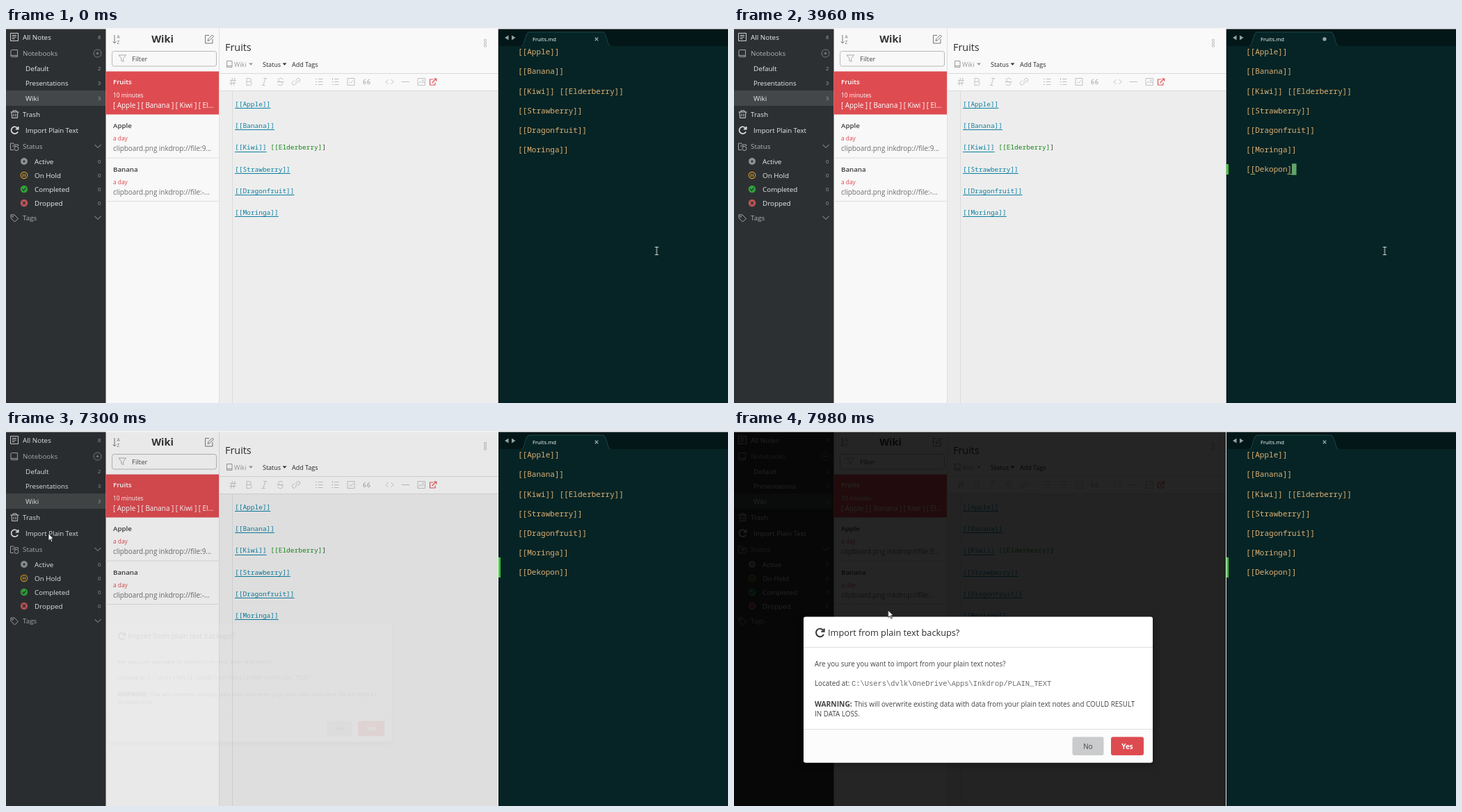
Animation, 1038 px wide and 540 px high, one loop 8 s. Source, as an HTML page:

```html
<!DOCTYPE html>
<html lang="en">
<head>
<meta charset="utf-8">
<title>Plain text import</title>
<style>
html, body { margin: 0; width: 100%; height: 100%; overflow: hidden; background: #062425; }
svg { display: block; width: 1038px; height: 540px; }
text { font: 9.85px "Open Sans", "Noto Sans", sans-serif; fill: #ebecec; white-space: pre; }
.line { fill: none; stroke-width: 1; stroke: #a4a6a8; }
.soft { fill: #adafb0; }
.num text { font-size: 7.5px; fill: #a0a2a4; }
.head { font-size: 9.7px; font-weight: 600; fill: #3c3c3c; }
.ago { font-size: 8.4px; fill: #dc4a50; }
.peek { font-size: 9.9px; fill: #6e6e6e; }
.red text { fill: #fff; }
.bar text { font-size: 9px; fill: #2a2a2a; }
.tools { fill: none; stroke: #c2c2c2; }
.tools text { font-size: 13px; fill: #bdbdbd; stroke: none; }
.md text { font: 9.5px "Noto Sans Mono", "DejaVu Sans Mono", monospace; fill: #0c81a3; }
.md path { stroke: #0c81a3; }
.code text { font: 11.03px "Noto Sans Mono", "DejaVu Sans Mono", monospace; fill: #dcaf74; }
.modal text { font-size: 9.87px; fill: #444; }
.modal .path { font: 10.42px "Liberation Mono", monospace; fill: #6c6c6c; }
.modal .title { font-size: 12.76px; fill: #2c2c2c; }
.modal .warn { font-size: 10.25px; }
.bold { font-weight: 700; }

.pen, .caret, .row, .above, .dirty, .clean, .m1, .m2, .edge, .dim, .modal,
.mouse, .beam, .beam2, .hand, .arrow { animation: 8s step-end -2ms infinite; }

.pen { animation-name: pen; }
@keyframes pen {
  0% { transform: translate(0, -14.1px); }
  12.625% { transform: translate(0, 0); }
  17.75% { transform: translate(6.6px, 0); }
  20.25% { transform: translate(13.2px, 0); }
  30.25% { transform: translate(19.8px, 0); }
  31.875% { transform: translate(26.4px, 0); }
  35.75% { transform: translate(33px, 0); }
  37.625% { transform: translate(39.6px, 0); }
  40.75% { transform: translate(46.2px, 0); }
  43.375% { transform: translate(52.8px, 0); }
  45.25% { transform: translate(59.4px, 0); }
  49.5% { transform: translate(66px, 0); }
  51.875%, 100% { transform: translate(72.8px, 0); }
}
.caret { animation-name: caret; }
@keyframes caret {
  0% { opacity: 0; }
  2.25% { opacity: .5; }
  3.375% { opacity: 1; }
  7.875% { opacity: .66; }
  8.75% { opacity: .33; }
  9.75% { opacity: 0; }
  12.625% { opacity: 1; }
  26% { opacity: 0; }
  30.25% { opacity: 1; }
  56.875% { opacity: .7; }
  57.625% { opacity: .4; }
  58.375% { opacity: .15; }
  59.125%, 100% { opacity: 0; }
}
.row { animation-name: row; }
@keyframes row { 0% { opacity: 0; } 12.625%, 100% { opacity: 1; } }
.above { animation-name: above; }
@keyframes above { 0%, 17.75% { opacity: 0; } 12.625%, 71.25%, 100% { opacity: 1; } }
.dirty { animation-name: dirty; }
@keyframes dirty { 0%, 71.25%, 100% { opacity: 0; } 12.625% { opacity: 1; } }
.clean { animation-name: clean; }
@keyframes clean { 0%, 71.25%, 100% { opacity: 1; } 12.625% { opacity: 0; } }
.m1 { animation-name: m1; }
@keyframes m1 { 0%, 51.875%, 100% { opacity: 0; } 49.5% { opacity: 1; } }
.m2 { animation-name: m2; }
@keyframes m2 { 0%, 71.25%, 100% { opacity: 0; } 51.875% { opacity: 1; } }
.edge { animation-name: edge; }
@keyframes edge { 0% { fill: #b9bcbc; } 85.625%, 100% { fill: #f2f2f2; } }

.dim { animation-name: fade; }
.modal { animation-name: fade, grow; transform-origin: 351px 318px; filter: drop-shadow(1px 3px 4px rgba(0, 0, 0, .3)); }
@keyframes fade {
  0% { opacity: 0; }
  91.25% { opacity: .075; }
  91.5% { opacity: .43; }
  92.375% { opacity: .9; }
  93.375%, 100% { opacity: 1; }
}
@keyframes grow {
  0% { transform: scale(.8); }
  91.25% { transform: scale(.812); }
  91.5% { transform: scale(.882); }
  92.375% { transform: scale(.98); }
  93.375%, 100% { transform: scale(1); }
}

.mouse { animation-name: mouse; animation-timing-function: linear; }
@keyframes mouse {
  0%, 56.875% { transform: translate(935.5px, 321px); }
  59.125% { transform: translate(936.5px, 320px); }
  66.875% { transform: translate(936.5px, 320px); animation-timing-function: ease-in-out; }
  76.875%, 77.25% { transform: translate(50px, 196px); animation-timing-function: ease-out; }
  81.625% { transform: translate(60px, 143px); }
  83.375% { transform: translate(61px, 147.5px); animation-timing-function: step-end; }
  98.75% { transform: translate(140px, 200px); animation-timing-function: step-end; }
  99.75%, 100% { transform: translate(221.5px, 258px); }
}
.beam { animation-name: beam; }
@keyframes beam { 0% { opacity: 1; } 70.4%, 100% { opacity: 0; } }
.beam2 { animation-name: beam2; }
@keyframes beam2 { 0%, 73.25%, 100% { opacity: 0; } 70.4% { opacity: 1; } }
.hand { animation-name: hand; }
@keyframes hand { 0%, 85.625%, 100% { opacity: 0; } 73.25% { opacity: 1; } }
.arrow { animation-name: arrow; }
@keyframes arrow { 0% { opacity: 0; } 85.625%, 100% { opacity: 1; } }
</style>
</head>
<body>
<svg viewBox="0 0 1038 540">
  <defs>
    <path id="redo" d="M4.2-2.9A5 5 0 1 0 4.6 2M5.2-5.2V-1.6H1.4" fill="none" stroke-width="1.7"/>
    <path id="chev" d="M-4.5-2L0 2.5L4.5-2" class="line"/>
    <path id="ibeam" d="M-2.5-5.5H2.5M0-5.5V5.5M-2.5 5.5H2.5" fill="none"/>
  </defs>

  <!-- sidebar -->
  <rect width="143.5" height="540" fill="#2d3033"/>
  <rect y="90" width="143.5" height="22" fill="#434749"/>
  <g>
    <text x="24" y="17">All Notes</text>
    <text x="24" y="40" class="soft">Notebooks</text>
    <text x="28" y="61.5">Default</text>
    <text x="28" y="83" style="font-size:9.6px">Presentations</text>
    <text x="28" y="104.5">Wiki</text>
    <text x="24" y="128">Trash</text>
    <text x="28" y="151" style="font-size:9.65px">Import Plain Text</text>
    <text x="24" y="174" class="soft">Status</text>
    <text x="41" y="195.5">Active</text>
    <text x="41" y="215.5">On Hold</text>
    <text x="41" y="235.5">Completed</text>
    <text x="41" y="255.5">Dropped</text>
    <text x="24" y="277" class="soft">Tags</text>
  </g>
  <g class="num">
    <text x="132" y="16">8</text>
    <text x="132" y="60.5">2</text>
    <text x="132" y="82">3</text>
    <text x="132" y="103.5">3</text>
    <text x="132" y="194.5">0</text>
    <text x="132" y="214.5">0</text>
    <text x="132" y="234.5">0</text>
    <text x="132" y="254.5">0</text>
  </g>
  <g class="line">
    <path d="M6.5 7.5H17.5V18.5H6.5ZM8.8 10.5H15M8.8 13H15M8.8 15.5H12.5" stroke="#d0d1d2"/>
    <path d="M8.5 31.5H16.5V41.5H8.5a1.5 1.5 0 0 1-1.5-1.5V33a1.5 1.5 0 0 1 1.5-1.5M7 39.5H16.5"/>
    <path d="M6.5 121H18.5M10 121V119H15V121M8 121L8.6 129.5H16.4L17 121M11 123.5V127.5M14 123.5V127.5" stroke="#d0d1d2"/>
    <path d="M17.5 170V168H12L10.5 166H6.5V175.5H11M9 170H14"/>
    <circle cx="15" cy="173.5" r="3"/>
    <path d="M7 269H12L17.5 274.5L12.5 279L7 273.7Z"/>
    <circle cx="9.6" cy="271.6" r=".8"/>
    <circle cx="131.5" cy="36.5" r="5.5" stroke="#7f8284"/>
    <path d="M129 36.5H134M131.5 34V39" stroke="#7f8284"/>
  </g>
  <use href="#redo" x="12.5" y="147.3" stroke="#dddedf"/>
  <use href="#chev" x="132" y="170"/>
  <use href="#chev" x="132" y="273"/>
  <circle cx="26" cy="192" r="5" fill="#8f9193"/>
  <circle cx="26" cy="192" r="1.6" fill="#2d3033"/>
  <path d="M21.3 212a4.7 4.7 0 1 0 9.4 0a4.7 4.7 0 1 0-9.4 0M24.6 209.8V214.2M27.4 209.8V214.2" fill="none" stroke="#d99a20" stroke-width="1.2"/>
  <circle cx="26" cy="232" r="5.2" fill="#2fa336"/>
  <path d="M23.5 232L25.4 234L28.7 230.2" fill="none" stroke="#2d3033" stroke-width="1.2"/>
  <circle cx="26" cy="252" r="5.2" fill="#bd5558"/>
  <path d="M24 250L28 254M28 250L24 254" stroke="#2d3033" stroke-width="1.2"/>

  <!-- note list -->
  <rect x="143.5" width="163" height="540" fill="#f8f8f8"/>
  <g class="line" style="stroke:#777">
    <path d="M156 10V22M153.5 19.5L156 22L158.5 19.5"/>
    <path d="M292 10.5H286.5V22H297V16M290 18.5L291 15.5L296.5 10L298.5 12L293 17.5Z"/>
    <rect x="152.5" y="33.5" width="150" height="21.5" rx="3" stroke="#b8b8b8"/>
    <path d="M162 39H172.5L168.7 43.8V48.5L165.8 47V43.8Z" stroke="#aaa"/>
  </g>
  <text x="159.5" y="15" style="font-size:6.5px;fill:#777">A</text>
  <text x="159.5" y="23" style="font-size:6.5px;fill:#777">Z</text>
  <text x="225" y="21" text-anchor="middle" class="bold" style="font-size:14.4px;fill:#333">Wiki</text>
  <text x="181" y="48" style="font-size:9.6px;fill:#4a4a4a">Filter</text>
  <g class="red">
    <rect x="143.5" y="62.5" width="163" height="62" fill="#de4c51"/>
    <text x="154" y="81" class="head">Fruits</text>
    <text x="154" y="100" class="ago">10 minutes</text>
    <text x="154" y="115" class="peek">[ Apple ] [ Banana ] [ Kiwi ] [ El...</text>
  </g>
  <text x="154" y="144" class="head">Apple</text>
  <text x="154" y="162" class="ago">a day</text>
  <text x="154" y="177" class="peek">clipboard.png inkdrop://file:9...</text>
  <text x="154" y="206.5" class="head">Banana</text>
  <text x="154" y="225" class="ago">a day</text>
  <text x="154" y="240" class="peek">clipboard.png inkdrop://file:-...</text>
  <path d="M143.5 187H306M143.5 249.5H306M306.5 1V540" stroke="#dedede"/>

  <!-- note editor -->
  <rect x="307" width="400" height="91" fill="#f9f9f9"/>
  <rect x="307" y="90" width="400" height="450" fill="#ededed"/>
  <path d="M307 65.5H707M307 90.5H707M325.5 91V540" stroke="#dadada"/>
  <text x="315" y="33" style="font-size:14.4px;fill:#2c2c2c">Fruits</text>
  <g fill="none" stroke="#c4c4c4">
    <path d="M687.5 16.5h3v2.5h-3zM687.5 20.5h3v2.5h-3zM687.5 24.5h3v2.5h-3z"/>
    <path d="M317.5 47.5H325V56.5H317.5ZM317.5 54.5H325" stroke="#999"/>
  </g>
  <g class="bar">
    <text x="328" y="55.5" style="fill:#999">Wiki</text>
    <text x="369" y="55.5">Status</text>
    <text x="411" y="55.5">Add Tags</text>
    <path d="M349 50.5H355L352 53.8Z" fill="#999"/>
    <path d="M397.5 50.5H403.5L400.5 53.8Z" fill="#333"/>
  </g>
  <g class="tools">
    <path d="M325.5 72L323.5 83M329 72L327 83M321.5 75.5H331M321 79.5H330.5"/>
    <path d="M346 72.5H350a2.3 2.3 0 0 1 0 4.8H346M346 72.5V82.5H350.5a2.5 2.5 0 0 0 0-5.2"/>
    <path d="M370 72.5H375M367.5 82.5H372.5M373 72.5L369.7 82.5"/>
    <path d="M389.5 77.5H399.5M398 74.5C397 71 390.5 72 391.5 75.5C392 77 397.5 77.5 397.7 80C398 83.5 391 83.5 390.7 80"/>
    <path d="M416 79L420 75M416.5 75.5L418.5 73.2a2.3 2.3 0 0 1 3.5 3.5L419.5 79M418 79L415.5 81.5a2.3 2.3 0 0 1-3.5-3.5L414.5 75.5"/>
    <path d="M449 73.5H455.5M449 77.5H455.5M449 81.5H455.5M445 73.5H447M445 77.5H447M445 81.5H447"/>
    <path d="M472 73.5H478.5M472 77.5H478.5M472 81.5H478.5M469.5 72V75M468.5 77.5H470.5M468.5 81.5H470.5"/>
    <path d="M491 72.5H501V82.5H491ZM493.5 77.5L495.4 79.5L499 75.5"/>
    <path d="M517 74C514 74.5 513.5 77 513.8 79a1.7 1.7 0 1 0 1.7-1.7H514M523 74C520 74.5 519.5 77 519.8 79a1.7 1.7 0 1 0 1.7-1.7H520" stroke="#aaa"/>
    <path d="M549.5 74L546 77.5L549.5 81M553.5 74L557 77.5L553.5 81M568.5 77.5H580"/>
    <path d="M592 72.5H602.5V82.5H592ZM592.5 80.5L596 77L598.5 79L600 77.5L602.5 80"/>
    <circle cx="599.5" cy="75.3" r=".8"/>
    <path d="M614 74H609.5V82H617V78.5M612.5 79L618.5 73M615 73H618.7V76.7" stroke="#e0555a" stroke-width="1.2"/>
  </g>
  <g class="md">
    <text x="329" y="113">[[Apple]]</text>
    <text x="329" y="144.2">[[Banana]]</text>
    <text x="329" y="175.4">[[Kiwi]] <tspan fill="#158a15">[[Elderberry]</tspan><tspan fill="#444">]</tspan></text>
    <text x="329" y="206.6">[[Strawberry]]</text>
    <text x="329" y="237.8">[[Dragonfruit]]</text>
    <text x="329" y="269">[[Moringa]]</text>
    <path d="M329 115.5h51.3M329 146.5h57M329 178.5h45.6M329 209.5h79.8M329 240.5h85.5M329 271.5h62.7"/>
  </g>

  <!-- code window -->
  <rect x="708" width="330" height="540" fill="#062425"/>
  <rect x="708" width="330" height="26" fill="#031618"/>
  <path d="M741 26C746 26 746 6 752 6H858C864 6 864 26 869 26Z" fill="#062425"/>
  <path d="M741 26C746 26 746 6 752 6H858C864 6 864 26 869 26" fill="none" stroke="#1b4648"/>
  <path d="M722.5 10.5V17.5L717 14ZM727 10.5V17.5L732.5 14Z" fill="#93a3a2"/>
  <text x="757" y="18.7" style="font-size:7.7px;fill:#fff">Fruits.md</text>
  <path class="clean" d="M846.7 13.7L851.3 18.3M851.3 13.7L846.7 18.3" stroke="#a9b6b5" stroke-width="1.2"/>
  <circle class="dirty" cx="849" cy="16" r="2.7" fill="#93a3a2"/>
  <rect x="708" width="1" height="540" fill="#020c0d"/>
  <g class="code">
    <text x="736" y="38">[[Apple]]</text>
    <text x="736" y="66.2">[[Banana]]</text>
    <text x="736" y="94.5">[[Kiwi]] [[Elderberry]]</text>
    <text x="736" y="122.7">[[Strawberry]]</text>
    <text x="736" y="150.9">[[Dragonfruit]]</text>
    <text x="736" y="179.2">[[Moringa]]</text>
    <text x="736" y="207.4">[[Dekopon]]</text>
  </g>
  <!-- the pen hides what is not typed yet -->
  <g class="pen">
    <rect x="736" y="196" width="90" height="34" fill="#062425"/>
    <rect class="caret" x="736" y="195.3" width="6.6" height="16.4" fill="#60a569"/>
  </g>
  <path class="m1" d="M742.6 210.5h6.6M795.4 210.5h6.6" stroke="#a6b365"/>
  <path class="m2" d="M736 210.5h6.6M802 210.5h6.6" stroke="#a6b365"/>
  <rect class="row" x="708" y="196" width="3" height="15" fill="#3fcb3c"/>
  <rect class="above" x="708" y="182" width="3" height="14" fill="#3fcb3c"/>

  <!-- dialog -->
  <rect class="dim" y="1" width="707" height="539" fill="#000" fill-opacity=".85"/>
  <g class="modal">
    <rect x="100" y="267.5" width="502" height="210" rx="3" fill="#fff"/>
    <path d="M100 430H602V474.5a3 3 0 0 1-3 3H103a3 3 0 0 1-3-3Z" fill="#fcfcfc"/>
    <path d="M100 311.5H602M100 429.5H602" stroke="#dedede"/>
    <use href="#redo" transform="translate(123.7 290.5) scale(1.15)" stroke="#333"/>
    <text x="135" y="295" class="title">Import from plain text backups?</text>
    <text x="116" y="338.5">Are you sure you want to import from your plain text notes?</text>
    <text x="116" y="367">Located at:</text>
    <text x="169" y="367" class="path">C:\Users\dvlk\OneDrive\Apps\Inkdrop/PLAIN_TEXT</text>
    <text x="116" y="396.5" class="bold warn">WARNING:</text>
    <text x="173" y="396.5">This will overwrite existing data with data from your plain text notes and COULD RESULT</text>
    <text x="116" y="410.7">IN DATA LOSS.</text>
    <rect x="486.5" y="440.5" width="45" height="26.5" rx="3" fill="#cacbcd"/>
    <rect x="542" y="440.5" width="47" height="26.5" rx="3" fill="#dd4b50"/>
    <text x="509" y="457.5" text-anchor="middle">No</text>
    <text x="565.5" y="457.5" text-anchor="middle" class="bold" style="fill:#fff">Yes</text>
  </g>

  <!-- window frame -->
  <rect class="edge" x="707" width="1" height="540"/>
  <rect width="1038" height="1.5" fill="#f4f4f4"/>

  <!-- pointer -->
  <g class="mouse">
    <use class="beam" href="#ibeam" stroke="#dfe4e4"/>
    <use class="beam2" href="#ibeam" stroke="#222"/>
    <path class="hand" d="M-1.3 9.5V1.2A1.3 1.3 0 0 1 1.3 1.2V5.4L3.2 5.8L5 6.3L6.3 7Q7 7.4 7 8.2V11.5L5.6 13.8V16H-.8V14.2L-4.3 9.8Q-4.6 8.2-3.2 8.2Z" fill="#fff" stroke="#111" stroke-width=".8" stroke-linejoin="round"/>
    <path class="arrow" d="M0 0V10.6L2.5 8.3L4.3 12.3L6 11.5L4.3 7.7H7.5Z" fill="#fff" stroke="#111" stroke-width=".8" stroke-linejoin="round"/>
  </g>
</svg>
</body>
</html>
```
